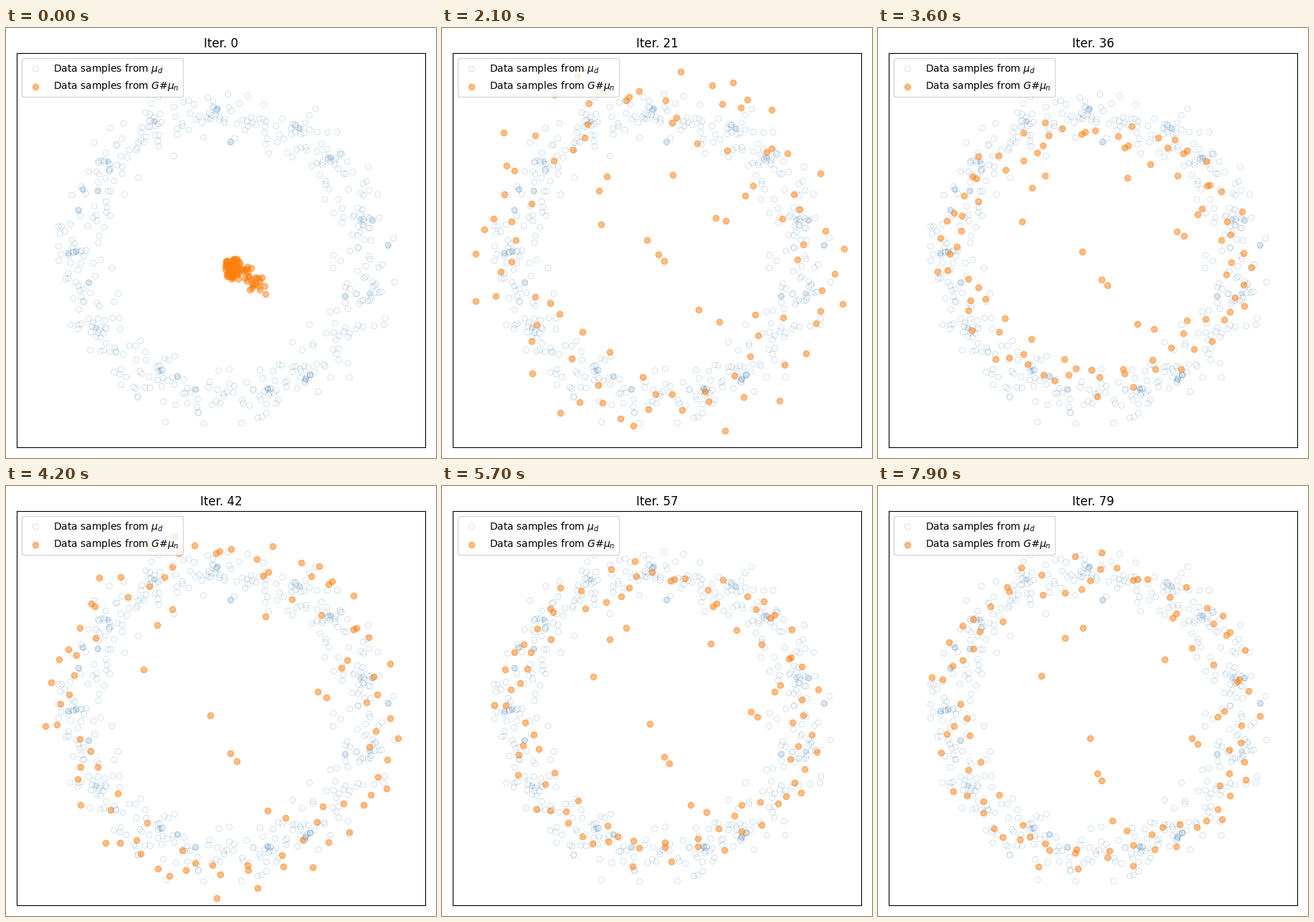
Animation of 600 by 600 pixels, one loop 8000 ms. Source, as a matplotlib script:

```python
import numpy as np
import matplotlib.pyplot as plt
from matplotlib.animation import FuncAnimation

FRAMES, STEP = 80, 100
CENTER = np.array([302, 318])
RING = 235
rng = np.random.default_rng(4)


def ring(count, radius, spread, low, high):
    """Evenly spread angles with jitter, radii scattered around a circle."""
    ang = 2 * np.pi * (np.arange(count) + rng.uniform(-1, 1, count)) / count
    rad = np.clip(rng.normal(radius, spread, count), low, high)
    return CENTER + rad[:, None] * np.c_[np.cos(ang), np.sin(ang)]


# Data samples: a noisy ring with a few dense spots
dense = np.array([
    (142, 186), (215, 478), (410, 140), (452, 180), (295, 112), (207, 130),
    (365, 503), (494, 267), (507, 370), (418, 490), (125, 418), (97, 312)])
clumps = np.repeat(dense, 8, axis=0) + rng.normal(0, 8, (len(dense) * 8, 2))
data = np.vstack([ring(390, 200, 20, 155, 245), clumps])
doubled = np.vstack([dense, rng.choice(data, 12, replace=False)])

# Generated samples: most settle on the ring, a few stay inside it
inner = np.array([
    (287, 326), (312, 383), (320, 389), (200, 258), (220, 196), (242, 175),
    (373, 187), (404, 175), (362, 467), (380, 464), (435, 300), (444, 308)])
rest = np.vstack([ring(88, 222, 16, 185, 248), inner])
offset = rest - CENTER
rho = np.hypot(*offset.T) / RING
pull = np.clip(1 - rho ** 2, 0, 1)[:, None]
jitter = rng.uniform(-1, 1, len(rest))

# They start as a small blob with a tail to the lower right
tail = rng.random(len(rest)) ** 4
blob = rng.random((len(rest), 2)) * [18, 26]
start = blob + [306, 322] + tail[:, None] * [46, 30]


def generated(n):
    # The ring breathes with a decaying swing and slowly turns clockwise
    swing = 0.08 + 0.2 * np.exp(-max(n - 25, 0) / 15)
    sy = 0.94 + swing * np.cos(2 * np.pi * (n - 25) / 20.5)
    sx = 0.97 + 0.45 * (sy - 0.95)
    turn = np.radians(14 * (n - 49) / 30)
    c, s = np.cos(turn), np.sin(turn)
    turned = offset @ np.array([[c, s], [-s, c]])

    # Early samples fill the disc, later ones gather on the ring
    slope = 1 / (1 + np.exp((n - 26) / 3))
    noise = 0.05 + 0.35 * np.exp(-(n / 13) ** 2)
    grow = np.maximum(1 + slope * (rho - 1), 0.45) + noise * jitter
    drift = (n - 49) * np.array([0.35, 1.0])
    pos = CENTER + turned * [sx, sy] * grow[:, None] + pull * drift

    mix = min(n / 6, 1) ** 1.3
    return start + (pos - start) * mix


fig = plt.figure(figsize=(6, 6), dpi=100)
ax = fig.add_axes([15 / 600, 15 / 600, 570 / 600, 550 / 600])
ax.set(xlim=(15, 585), ylim=(585, 35), xticks=[], yticks=[])

ax.scatter(*data.T, s=33, facecolors="none", edgecolors="steelblue",
           linewidths=0.7, alpha=0.25, label=r"Data samples from $\mu_d$")
ax.scatter(*doubled.T, s=33, color="steelblue", linewidths=0.7, alpha=0.2)
dots = ax.scatter(*start.T, s=36, color="C1", alpha=0.5,
                  label=r"Data samples from $G\#\mu_n$")
ax.legend(loc="upper left")
title = ax.set_title("Iter. 0")


def draw(n):
    dots.set_offsets(generated(n))
    title.set_text(f"Iter. {n}")
    return dots, title


anim = FuncAnimation(fig, draw, frames=FRAMES, interval=STEP,
                     repeat=True, repeat_delay=0, blit=False)
plt.show()
```
